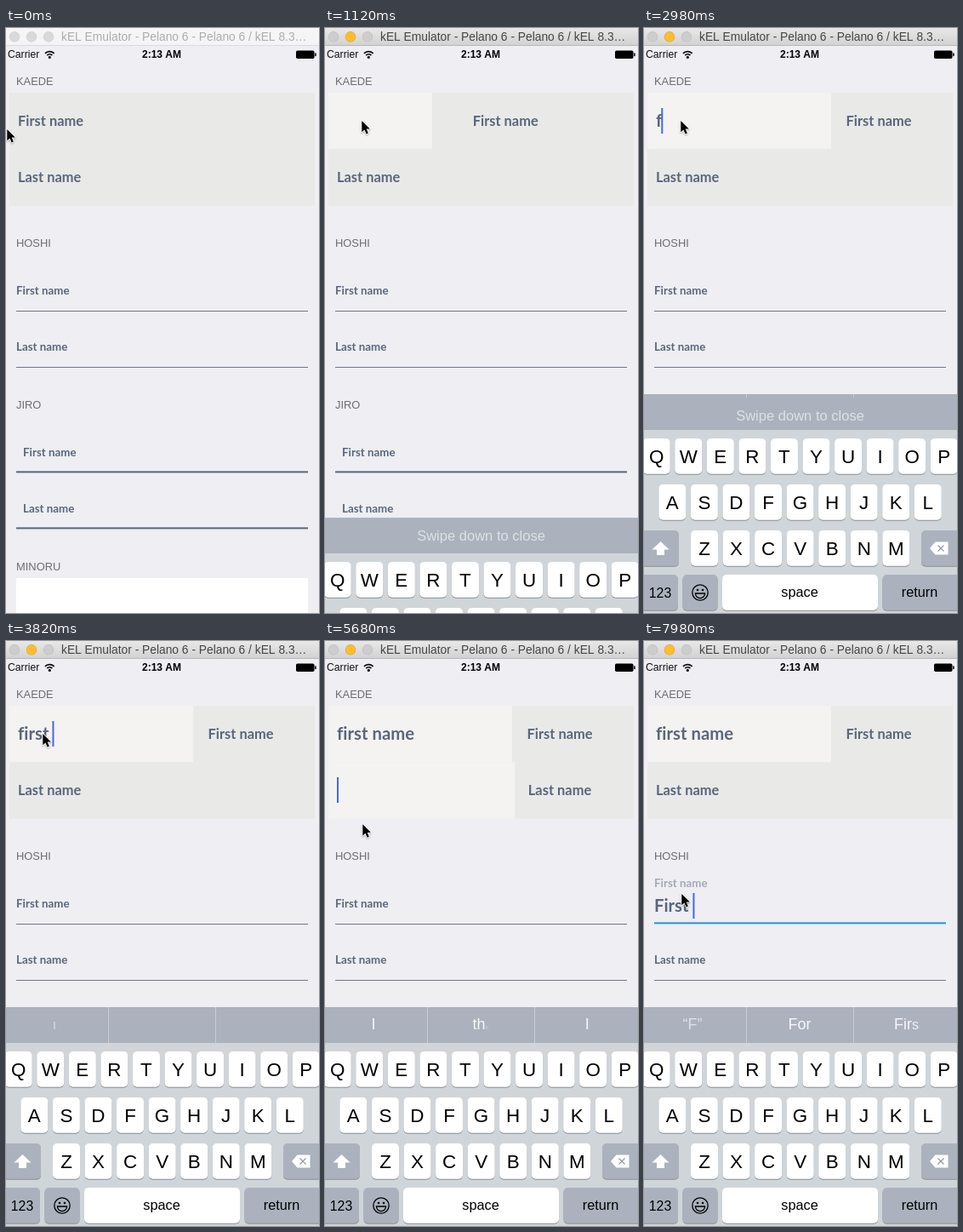
Write an HTML page with a canvas that moves like this. It is 368 px wide and 687 px high and loops after 8 s.

```html
<!DOCTYPE html>
<html lang="en">
<head>
<meta charset="utf-8">
<title>Text field effects</title>
<style>
  html, body { margin: 0; width: 100%; height: 100%; overflow: hidden; background: #eeeef3; }
  canvas { display: block; width: 368px; height: 687px; }
</style>
</head>
<body>
<canvas id="stage"></canvas>
<script>
const W = 368, H = 687, LOOP = 8000;
const SANS = '"Liberation Sans", Arial, sans-serif';
const SOFT = 'Lato, "Open Sans", sans-serif';
const BG = '#eeeef3', INK = '#5a667b', LINE = '#6f7686', GREY_KEY = '#abb2be';

// Moments of the main actions
const FOCUS = 730, TAP_1 = 970, TAP_2 = 5250, TAP_3 = 6350;

const canvas = document.getElementById('stage');
const ctx = canvas.getContext('2d');
const ratio = window.devicePixelRatio || 1;
canvas.width = W * ratio;
canvas.height = H * ratio;

/* ---------- motion ---------- */

const clamp = v => Math.max(0, Math.min(1, v));
const ramp = (t, start, dur) => clamp((t - start) / dur);
const ease = p => p * p * (3 - 2 * p);
const mix = (a, b, p) => a + (b - a) * p;

// Damped spring from 0 to 1: w is its speed per ms, z its damping below 1
function spring(u, w, z) {
  if (u <= 0) return 0;
  const s = Math.sqrt(1 - z * z), a = w * s * u;
  return 1 - Math.exp(-z * w * u) * (Math.cos(a) + z / s * Math.sin(a));
}

// Even typing: the text so far and the time since its last letter
function typing(t, phrase, start, pace) {
  const n = Math.max(0, Math.min(phrase.length, Math.floor((t - start) / pace) + 1));
  return { text: phrase.slice(0, n), age: t - start - (n - 1) * pace };
}

// Caret opacity: shown at `from`, blinking since `fade`, gone at `to`
function blink(t, from, fade, to) {
  if (t < from || t >= to) return 0;
  if (t < fade) return ramp(t, from, 50);
  const u = (t - fade) % 960;
  return 1 - ramp(u, 0, 180) + ramp(u, 480, 180);
}

/* ---------- drawing helpers ---------- */

function rect(x, y, w, h, color) {
  ctx.fillStyle = color;
  ctx.fillRect(x, y, w, h);
}

function round(x, y, w, h, r, color) {
  ctx.fillStyle = color;
  ctx.beginPath();
  ctx.roundRect(x, y, w, h, r);
  ctx.fill();
}

function dot(x, y, r, color) {
  ctx.fillStyle = color;
  ctx.beginPath();
  ctx.arc(x, y, r, 0, 7);
  ctx.fill();
}

function poly(pts, color) {
  ctx.fillStyle = color;
  ctx.beginPath();
  pts.forEach(([x, y]) => ctx.lineTo(x, y));
  ctx.closePath();
  ctx.fill();
}

// y is the middle of the capital letters
function text(str, x, y, size, color, { weight = 400, font = SANS, align = 'left', gap = 0 } = {}) {
  ctx.font = `${weight} ${size}px ${font}`;
  ctx.letterSpacing = gap + 'px';
  ctx.textAlign = align;
  ctx.fillStyle = color;
  ctx.fillText(str, x, y + size * 0.36);
  return ctx.measureText(str).width;
}

// The slight gap keeps f and i from joining
const soft = (str, x, y, size) =>
  text(str, x, y, size, INK, { font: SOFT, weight: 700, gap: 0.02 });

const centered = (str, x, y, size, color) => text(str, x, y, size, color, { align: 'center' });

function withAlpha(a, draw) {
  ctx.save();
  ctx.globalAlpha *= clamp(a);
  draw();
  ctx.restore();
}

function caret(x, y, alpha) {
  withAlpha(alpha, () => rect(x, y, 2, 30, '#4568e6'));
}

/* ---------- window and status bar ---------- */

function titleBar(active) {
  const g = ctx.createLinearGradient(0, 0, 0, 20);
  g.addColorStop(0, active ? '#e9e8e9' : '#f6f6f6');
  g.addColorStop(1, active ? '#d3d2d3' : '#f4f4f4');
  rect(0, 0, W, 20, g);
  rect(0, 20, W, 1, active ? '#b8b7ba' : '#dcdcde');
  for (let i = 0; i < 3; i++) {
    const lit = active && i === 1, x = 10 + 20 * i;
    dot(x, 10.3, 6.2, lit ? '#e0a327' : active ? '#bdbdbd' : '#d0d0d0');
    dot(x, 10.3, 5.6, lit ? '#fdbd2f' : active ? '#cecdce' : '#d9d9d9');
  }
  text('kEL Emulator - Pelano 6 - Pelano 6 / kEL 8.3…', 65, 10.5, 13.8, active ? '#464646' : '#adadad');
}

function statusBar() {
  text('Carrier', 2, 31, 12.2, '#111');
  text('2:13 AM', 183, 31, 12, '#000', { weight: 700, align: 'center' });
  ctx.strokeStyle = '#111';
  ctx.lineWidth = 1.7;
  for (const r of [4.2, 7.4]) {
    ctx.beginPath();
    ctx.arc(51.3, 35, r, -Math.PI * 0.76, -Math.PI * 0.24);
    ctx.stroke();
  }
  dot(51.3, 34.4, 1.6, '#111');
  round(341, 26.5, 21.5, 9.5, 1.8, '#000');
  round(363.2, 29.3, 1.5, 4, 0.7, '#000');
}

/* ---------- text fields ---------- */

const firstText = t => t < 2900
  ? { text: t < 2690 ? '' : 'f', age: t - 2690 }
  : typing(t, 'first name', 2900, 178);
const hoshiText = t => typing(t, 'First ', 7340, 128);

// The grey cover and its label slide right when the field opens
function kaedeRow(t, y, label, tap, close) {
  const back = 1 - ease(ramp(t, close, 290));
  const edge = mix(4, 220, spring(t - tap - 20, 0.01277, 0.8) * back);
  const x = mix(14, 237.5, spring(t - tap, 0.01467, 0.85) * back);
  rect(4, y - 33, 359, 66.5, '#f4f3f2');
  rect(edge, y - 33, 363 - edge, 66.5, '#e9e9e8');
  soft(label, x, y, 16.4);
}

function kaede(t) {
  kaedeRow(t, 109, 'First name', TAP_1, Infinity);
  kaedeRow(t, 175.3, 'Last name', TAP_2, TAP_3);
  const typed = firstText(t).text;
  const w = soft(typed, 14, 109, 20.3);
  caret(14 + Math.max(0, w - 1), 94, typed && t < TAP_2 ? 1 : blink(t, 1150, 2030, TAP_2));
  caret(14, 160, blink(t, 5400, 5840, 6300));
}

function hoshi(t) {
  rect(12, 332, 343, 1, LINE);
  const grow = ease(ramp(t, TAP_3, 290));
  if (grow > 0) {
    rect(12, 332, 343 * grow, 1, BG);
    rect(12, 330.3, 343 * grow, 2, '#2694d8');
  }
  const out = ramp(t, TAP_3, 220);
  if (out < 1) withAlpha(1 - out, () => soft('First name', 12 + 10 * out, 308, 13.3));
  else withAlpha(0.5 * ramp(t, TAP_3 + 220, 180), () => soft('First name', 12, 284, 13.3));

  const typed = hoshiText(t).text;
  const w = soft(typed, 12, 311, 20.2);
  caret(12 + w, 296, typed ? 1 : blink(t, 6450, 6890, LOOP));

  soft('Last name', 12, 374, 13.3);
  rect(12, 398, 343, 1, LINE);
}

function jiro() {
  ['First name', 'Last name'].forEach((name, i) => {
    soft(name, 20, 498 + 66 * i, 13.3);
    rect(12, 520.4 + 66 * i, 343, 2, INK);
  });
}

/* ---------- word hints ---------- */

const VOCAB = ['for', 'first', 'firstly', 'name', 'names'];

function hintsFor(typed) {
  const word = typed.split(' ').pop();
  if (!word) return ['I', 'the', "I'm"];
  const found = VOCAB.filter(v => v.startsWith(word.toLowerCase()));
  return [`“${word}”`, ...found.slice(0, 2).map(v => word + v.slice(word.length))];
}

function hintState(t) {
  if (t >= 7340) return { text: 'F', age: t - 7340 };
  return t >= TAP_2 ? { text: '', age: t - TAP_2 } : firstText(t);
}

// Fresh letters grow: the left slot from its end, the others past the typed part
function hintWord(word, slot, typedLen, age, y) {
  const x = 57 + 126 * slot;
  const color = `rgba(255,255,255,${word[0] === '“' ? 0.62 : 0.9})`;
  const kept = typedLen - slot;
  const parts = [...word].map((ch, i) => {
    const p = slot
      ? (i < kept ? 1 : clamp((age - (i - kept) * 120) / 180))
      : clamp((age - (word.length - 1 - i) * 25) / 45);
    ctx.font = `${18 * p}px ${SANS}`;
    return { ch, p, w: p > 0 ? ctx.measureText(ch).width : 0 };
  });
  if (parts.every(c => c.p === 1)) return centered(word, x, y, 18, color);
  let left = x - parts.reduce((sum, c) => sum + c.w, 0) / 2;
  for (const c of parts) {
    if (c.p > 0) withAlpha(c.p, () => text(c.ch, left, y + 6.5 * (1 - c.p), 18 * c.p, color));
    left += c.w;
  }
}

function hintBar(t) {
  ctx.save();
  ctx.beginPath();
  ctx.rect(0, 430, W, 42);
  ctx.clip();
  rect(0, 430, W, 42, '#abb1bd');
  const shift = 42 * ease(ramp(t, 2930, 280));
  centered('Swipe down to close', 183.5, 451 + shift, 16.55, 'rgba(255,255,255,.62)');
  if (shift > 0) {
    const top = 388 + shift;
    rect(120, top, 1, 42, '#c9cdd5');
    rect(246, top, 1, 42, '#c9cdd5');
    const state = hintState(t);
    const len = state.text.split(' ').pop().length;
    hintsFor(state.text).forEach((word, i) => hintWord(word, i, len, state.age, top + 20));
  }
  ctx.restore();
}

/* ---------- keyboard ---------- */

function key(x, y, w, color = '#fff') {
  round(x, y + 1, w, 41.7, 5, '#8b8f96');
  round(x, y, w, 41.7, 5, color);
}

function keyRow(letters, x0, y) {
  [...letters].forEach((ch, i) => {
    const x = x0 + 37.56 * i;
    key(x, y, 32);
    centered(ch, x + 16, y + 21, 22.4, '#000');
  });
}

function smiley(x, y) {
  ctx.strokeStyle = '#000';
  ctx.lineWidth = 1.3;
  ctx.beginPath();
  ctx.arc(x, y, 9.2, 0, 7);
  ctx.stroke();
  dot(x - 3, y - 3, 1.3, '#000');
  dot(x + 3, y - 3, 1.3, '#000');
  ctx.beginPath();
  ctx.arc(x, y + 1, 5.6, 0, Math.PI);
  ctx.closePath();
  ctx.stroke();
}

function keyboard(t) {
  const drop = 257 * (1 - spring(t - 1040, 0.01826, 0.999));
  ctx.save();
  ctx.translate(0, drop);
  rect(0, 472, W, 215, '#d0d5d9');
  hintBar(t);

  keyRow('QWERTYUIOP', -1.3, 482);
  keyRow('ASDFGHJKL', 17.3, 536);
  keyRow('ZXCVBNM', 55, 590);

  key(-4, 590, 45, GREY_KEY);
  poly([[19.5, 603], [29.5, 612.5], [9.5, 612.5]], '#fff');
  rect(15, 612, 9, 7, '#fff');

  key(326, 590, 46, GREY_KEY);
  poly([[336, 611], [342.5, 603.5], [357.5, 603.5], [357.5, 618.5], [342.5, 618.5]], '#fff');
  ctx.strokeStyle = '#9299a5';
  ctx.lineWidth = 1.2;
  ctx.beginPath();
  for (const d of [-3.5, 3.5]) {
    ctx.moveTo(345.5, 611 - d);
    ctx.lineTo(352.5, 611 + d);
  }
  ctx.stroke();

  key(-4, 642, 44, GREY_KEY);
  key(45.5, 642, 41, GREY_KEY);
  key(92, 642, 183);
  key(280.5, 642, 92, GREY_KEY);
  centered('123', 19, 663.5, 15.8, '#000');
  smiley(66, 663);
  centered('space', 183, 662, 16.3, '#000');
  centered('return', 324, 662, 16.3, '#000');
  ctx.restore();
}

/* ---------- pointer ---------- */

const MOVES = [
  { start: 50, dur: 380, x: 43, y: 109 },
  { start: 4780, dur: 250, x: 44, y: 172 },
  { start: 5485, dur: 565, x: 44, y: 297 }
];
const ARROW = [[0, 0], [0, 14.5], [3.4, 11.4], [5.8, 16.8], [8.2, 15.7], [5.9, 10.4], [10.4, 10.2]];

function pointer(t) {
  let x = 1, y = 119;
  for (const m of MOVES) {
    const p = ramp(t, m.start, m.dur);
    x = mix(x, m.x, p);
    y = mix(y, m.y, p);
  }
  ctx.save();
  ctx.translate(x + 0.3, y);
  ctx.scale(0.92, 0.92);
  ctx.lineJoin = 'round';
  ctx.lineWidth = 1.8;
  ctx.strokeStyle = '#fff';
  ctx.beginPath();
  ARROW.forEach(([a, b]) => ctx.lineTo(a, b));
  ctx.closePath();
  ctx.shadowColor = 'rgba(0,0,0,.3)';
  ctx.shadowBlur = 2 * ratio;
  ctx.shadowOffsetY = ratio;
  ctx.stroke();
  ctx.shadowColor = 'transparent';
  poly(ARROW, '#000');
  ctx.restore();
}

function draw(t) {
  ctx.setTransform(ratio, 0, 0, ratio, 0, 0);
  rect(0, 0, W, H, BG);
  ['KAEDE', 'HOSHI', 'JIRO', 'MINORU'].forEach((name, i) =>
    text(name, 12, 62 + 190 * i, 12.9, '#6d6d72'));
  kaede(t);
  hoshi(t);
  jiro();
  rect(12, 646, 343, 41, '#fff');
  keyboard(t);
  statusBar();
  titleBar(t >= FOCUS);
  pointer(t);
}

const start = performance.now();
function tick() {
  draw((performance.now() - start) % LOOP);
  requestAnimationFrame(tick);
}
tick();
</script>
</body>
</html>
```
